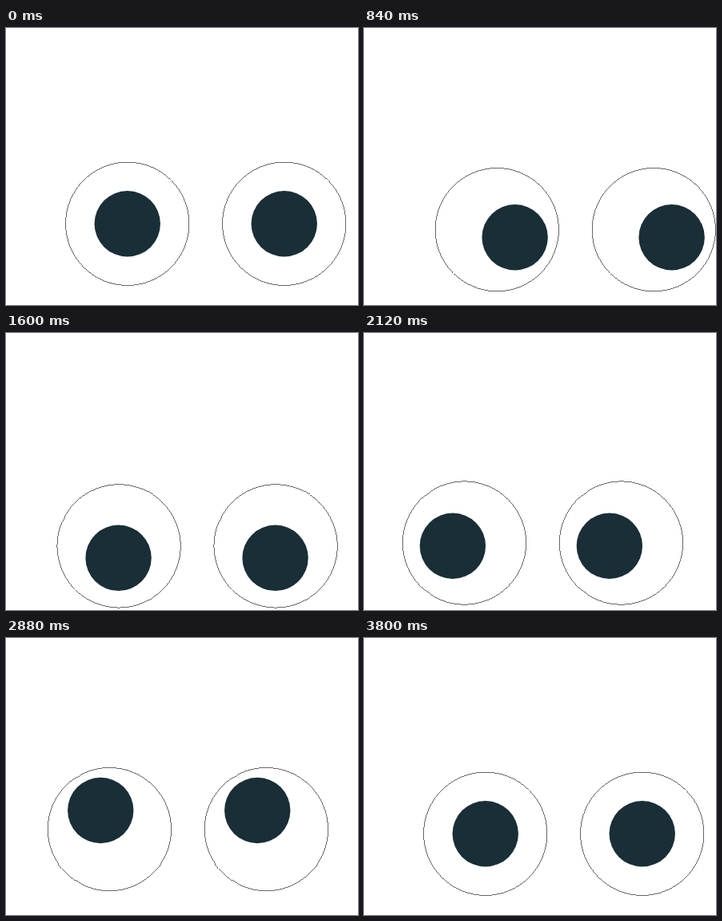
An HTML page that plays this animation: 440 px wide and 347 px high, repeating every 3840 ms.

```html
<!DOCTYPE html>
<html lang="en">
<head>
<meta charset="utf-8">
<title>Rolling eyes</title>
<style>
  html, body { margin: 0; width: 100%; height: 100%; overflow: hidden; background: #fff; }
  svg { display: block; width: 440px; height: 347px; }
  .ball { fill: #fff; stroke: #000; stroke-width: .6; shape-rendering: crispEdges; }
  .pupil { fill: #192e36; }
</style>
</head>
<body>
<svg viewBox="0 0 440 347">
  <defs>
    <g id="eye">
      <circle class="ball" r="77.2"/>
      <circle class="pupil" r="41.2"/>
    </g>
  </defs>
  <use href="#eye"/>
  <use href="#eye" x="196"/>
</svg>
<script>
const LOOP = 3840, STEP = 40, TRAVEL = 3800;

// Smooth closed curve through the keys, one path per side
function curves(keys) {
  const n = keys.length;
  const key = i => keys[(i + n) % n];
  const handle = (i, sign) => key(i).map((v, k) => v + sign * (key(i + 1)[k] - key(i - 1)[k]) / 6);
  return keys.map((start, i) => {
    const path = document.createElementNS("http://www.w3.org/2000/svg", "path");
    path.setAttribute("d", `M${start} C${handle(i, 1)} ${handle(i + 1, -1)} ${key(i + 1)}`);
    return path;
  });
}

function mover(selector, keys) {
  const circle = document.querySelector(selector);
  const sides = curves(keys);
  // Each side takes equal time at a constant speed
  return progress => {
    const at = progress * sides.length;
    const side = sides[Math.floor(at)];
    const { x, y } = side.getPointAtLength(at % 1 * side.getTotalLength());
    circle.setAttribute("cx", x);
    circle.setAttribute("cy", y);
  };
}

const rest = [151.75, 245.25];
const movers = [
  mover(".ball", [rest, [165.5, 254.6], [128.8, 269], [128.8, 240.1]]),
  mover(".pupil", [rest, [190, 266.6], [117, 280.5], [117, 216.75]])
];

function draw(now) {
  const t = Math.floor(now % LOOP / STEP) * STEP;
  for (const move of movers) move(t % TRAVEL / TRAVEL);
}

let start;
function tick(now) {
  start ??= now;
  draw(now - start);
  requestAnimationFrame(tick);
}
draw(0);
requestAnimationFrame(tick);
</script>
</body>
</html>
```
